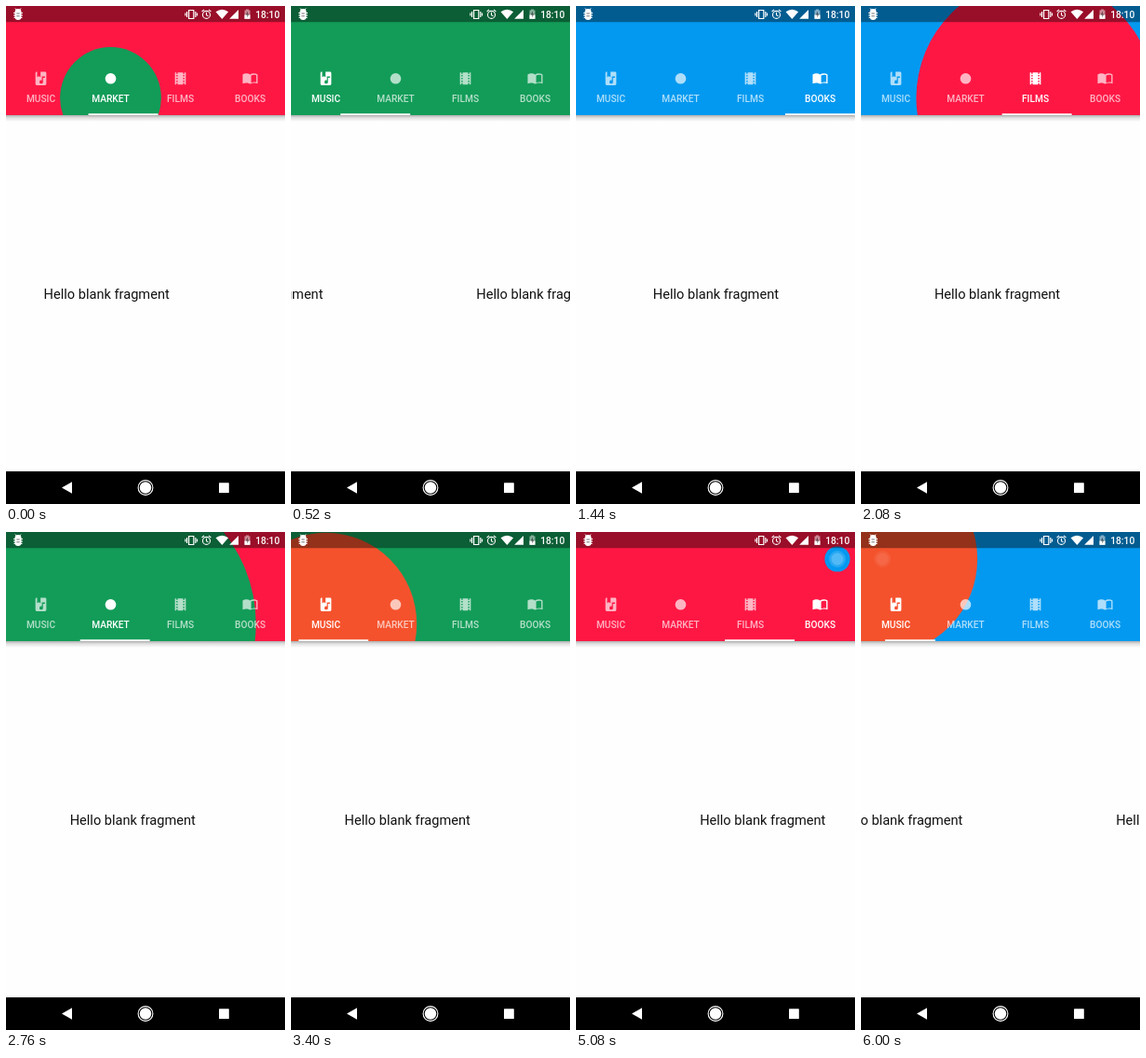
An HTML page for the animation above (6040 ms loop, 300 px wide and 534 px high).

```html
<!DOCTYPE html>
<html lang="en">
<head>
<meta charset="utf-8">
<title>Colour tabs</title>
<style>
html, body { margin: 0; width: 100%; height: 100%; overflow: hidden; background: #fff; }
svg { display: block; width: 100vw; height: 100vh; font-family: Roboto, sans-serif; }
.label { font-size: 10.2px; font-weight: 500; text-anchor: middle; }
.page { font-size: 14.6px; fill: #111; text-anchor: middle; }
.clock { font-size: 10.3px; font-weight: 500; text-anchor: end; }
</style>
</head>
<body>
<svg viewBox="0 0 300 534">
  <defs>
    <linearGradient id="shade" x2="0" y2="1">
      <stop offset="0" stop-opacity=".32"/>
      <stop offset=".4" stop-opacity=".12"/>
      <stop offset="1" stop-opacity="0"/>
    </linearGradient>
    <clipPath id="barClip"><path d="M0 0H300V117H0z"/></clipPath>
  </defs>
  <path fill="#fefefe" d="M0 0H300V534H0z"/>
  <g id="pages"></g>
  <path fill="url(#shade)" d="M0 117H300V124H0z"/>

  <g clip-path="url(#barClip)">
    <rect id="base" width="300" height="117"/>
    <circle id="reveal"/>
    <path fill-opacity=".4" d="M0 0H300V17.3H0z"/>
  </g>
  <g id="tabs" fill="#fff" fill-rule="evenodd"></g>
  <rect id="line" y="115.3" height="1.7" fill="#fff"/>

  <g id="status" fill="#fff">
    <path d="M9.5 6.5a3.5 3.5 0 0 1 7 0v5a3.5 3.5 0 0 1-7 0z"/>
    <path d="M10 2.5l1.5 2M16 2.5l-1.5 2M8 7.5h10M8 10h10M8.5 12.5h9" stroke="#fff"/>
    <path d="M11.3 8h3.4M11.3 10.8h3.4" stroke="#000" stroke-opacity=".55"/>
    <path d="M196.6 4.5h5.2v9h-5.2zM194.6 6v6M203.8 6v6M192.9 7.5v3M205.5 7.5v3" fill="none" stroke="#fff" stroke-width="1.2"/>
    <path d="M215.5 6.7v3l2 1.2M210.6 6l2.5-2.1M220.4 6l-2.5-2.1" fill="none" stroke="#fff" stroke-width="1.1"/>
    <circle cx="215.5" cy="9.4" r="4" fill="none" stroke="#fff" stroke-width="1.1"/>
    <path d="M225.5 6.2q6.8-5 13.6 0L232.3 14z"/>
    <path d="M250 4v9.8h-9.8z"/>
    <path d="M258 3.5h3v1h1.5v9.3h-6V4.5h1.5z" fill-opacity=".5"/>
    <path d="M256.5 9.5h6v4.3h-6z"/>
    <path d="M260 5.5l-2.3 4h1.5v3l2.2-4h-1.4z" fill="#000" fill-opacity=".5"/>
    <text class="clock" x="294.3" y="13">18:10</text>
  </g>
  <g id="dot" fill="#fff">
    <circle r="9" fill-opacity=".22"/>
    <circle r="6.5" fill-opacity=".3"/>
  </g>

  <path d="M0 499H300V534H0z"/>
  <g fill="#fff">
    <path d="M60 516.5l11-6.3v12.6z"/>
    <circle cx="150" cy="516.5" r="6.2"/>
    <circle cx="150" cy="516.5" r="7.9" fill="none" stroke="#fff" stroke-width="1.1"/>
    <rect x="229" y="511.2" width="10.8" height="10.8" rx=".6"/>
  </g>
</svg>
<script>
const LOOP = 6040, STEP = 40, TAB = 75, WIDTH = 300;
const TABS = [
  { name: 'MUSIC', color: '#f4522d',
    icon: 'M6 2h12a2 2 0 0 1 2 2v16a2 2 0 0 1-2 2H6a2 2 0 0 1-2-2V4a2 2 0 0 1 2-2zM6.5 2v8L9 8.4l2.5 1.6V2zM13.5 9v5.6a2.6 2.6 0 1 0 1.6 2.4v-6H18V9z' },
  { name: 'MARKET', color: '#129c58',
    icon: 'M12 4a8 8 0 1 0 0 16a8 8 0 1 0 0-16z' },
  { name: 'FILMS', color: '#ff1744',
    icon: 'M18 3v2h-2V3H8v2H6V3H4v18h2v-2h2v2h8v-2h2v2h2V3zM8 17H6v-2h2zM8 13H6v-2h2zM8 9H6V7h2zM18 17h-2v-2h2zM18 13h-2v-2h2zM18 9h-2V7h2z' },
  { name: 'BOOKS', color: '#0399f0',
    icon: 'M1 6c3-2 8-2 11 0c3-2 8-2 11 0v13.5c-3-1.5-8-1.5-11 .5c-3-2-8-2-11-.5zM13.5 7.6c2-1.2 5-1.3 7.6-.5v10.2c-2.6-.6-5.6-.4-7.6.7z' }
];

// at: moment of selection; swipes drag first and then settle for `settle` ms
const MOVES = [
  { at: -103, to: 1, drag: 160, settle: 375 },
  { at: 510, to: 0, drag: 250, settle: 375 },
  { at: 1105, to: 3, tap: [272, 37], press: 145 },
  { at: 1925, to: 2, drag: 165, settle: 281 },
  { at: 2587, to: 1, drag: 110, settle: 414 },
  { at: 3265, to: 0, drag: 185, settle: 390 },
  { at: 3863, to: 1, tap: [107, 34], press: 105 },
  { at: 4463, to: 2, tap: [187, 33], press: 105 },
  { at: 5020, to: 3, tap: [281, 29], press: 105 },
  { at: 5862, to: 0, tap: [23, 29], press: 65 }
];
MOVES.forEach((m, i) => m.from = i ? MOVES[i - 1].to : 2);

const $ = id => document.getElementById(id);
const clamp = v => Math.min(1, Math.max(0, v));
const mix = (a, b, k) => a + (b - a) * k;
const quint = k => 1 - (1 - clamp(k)) ** 5;
const cosine = k => (1 - Math.cos(Math.PI * clamp(k))) / 2;

function set(el, attrs) {
  for (const key in attrs) el.setAttribute(key, attrs[key]);
}
function add(parent, tag, attrs, text = '') {
  const el = document.createElementNS('http://www.w3.org/2000/svg', tag);
  set(el, attrs);
  el.textContent = text;
  return parent.appendChild(el);
}

// cubic-bezier(.4, 0, .2, 1)
function standard(x) {
  if (x <= 0 || x >= 1) return clamp(x);
  let lo = 0, hi = 1, s;
  for (let i = 0; i < 20; i++) {
    s = (lo + hi) / 2;
    const v = 1.2 * (1 - s) ** 2 * s + 0.6 * (1 - s) * s * s + s ** 3;
    if (v < x) lo = s; else hi = s;
  }
  return 3 * (1 - s) * s * s + s ** 3;
}

const tabs = TABS.map((tab, i) => {
  const g = add($('tabs'), 'g', { transform: `translate(${(i + 0.5) * TAB} 0)` });
  add(g, 'path', { d: tab.icon, transform: 'translate(-8.75 69) scale(.73)' });
  add(g, 'text', { class: 'label', y: 103 }, tab.name);
  return g;
});
const pages = TABS.map(() => add($('pages'), 'text', { class: 'page', y: 314 }, 'Hello blank fragment'));

const lastMove = (t, lead) => MOVES.filter(m => m.at - lead(m) <= t).pop() || MOVES[0];
const scrolling = t => lastMove(t, m => m.drag || 0);

function pagerAt(t) {
  const m = scrolling(t), dt = t - m.at;
  if (m.tap) return mix(m.from, m.to, quint(dt / (100 * (Math.abs(m.to - m.from) + 1))));
  const pull = 0.3;
  const k = dt < 0 ? pull * clamp(1 + dt / m.drag) ** 2 : mix(pull, 1, quint(dt / m.settle));
  return mix(m.from, m.to, k);
}

function lineAt(t) {
  const m = scrolling(t);
  if (!m.tap) {
    const left = pagerAt(t - 14) * TAB;
    return [left, left + TAB];
  }
  const end = m.to * TAB, k = standard((t - m.at) / 300);
  let left = m.from * TAB, right = left + TAB;
  // for distant tabs the line grows from a point beside the new tab
  if (Math.abs(m.to - m.from) > 1) left = right = m.to < m.from ? end + TAB + 17.5 : end - 17.5;
  return [mix(left, end, k), mix(right, end + TAB, k)];
}

function draw(t) {
  const pos = pagerAt(t);
  pages.forEach((p, i) => set(p, { x: 150.3 + (i - pos) * WIDTH }));

  const m = lastMove(t, () => 0);
  tabs.forEach((g, i) => set(g, { opacity: i === m.to ? 1 : 0.68 }));
  const [cx, cy] = m.tap || [(m.to + 0.5) * TAB, 98.5];
  const k = (t - m.at - 19) / 300;
  $('base').setAttribute('fill', TABS[k >= 1 ? m.to : m.from].color);
  set($('reveal'), { cx, cy, r: WIDTH * cosine(k), fill: TABS[m.to].color });

  const [left, right] = lineAt(t);
  set($('line'), { x: left, width: right - left });

  const touch = MOVES.find(v => v.tap && t >= v.at - v.press && t < v.at + 200);
  set($('dot'), touch
    ? { transform: `translate(${touch.tap})`,
        opacity: Math.min(clamp((t - touch.at + touch.press + 30) / 60), 1 - clamp((t - touch.at) / 190)) }
    : { opacity: 0 });
}

const start = performance.now();
function tick() {
  const t = Math.max(0, performance.now() - start) % LOOP;
  draw(Math.floor(t / STEP) * STEP);
  requestAnimationFrame(tick);
}
tick();
</script>
</body>
</html>
```
